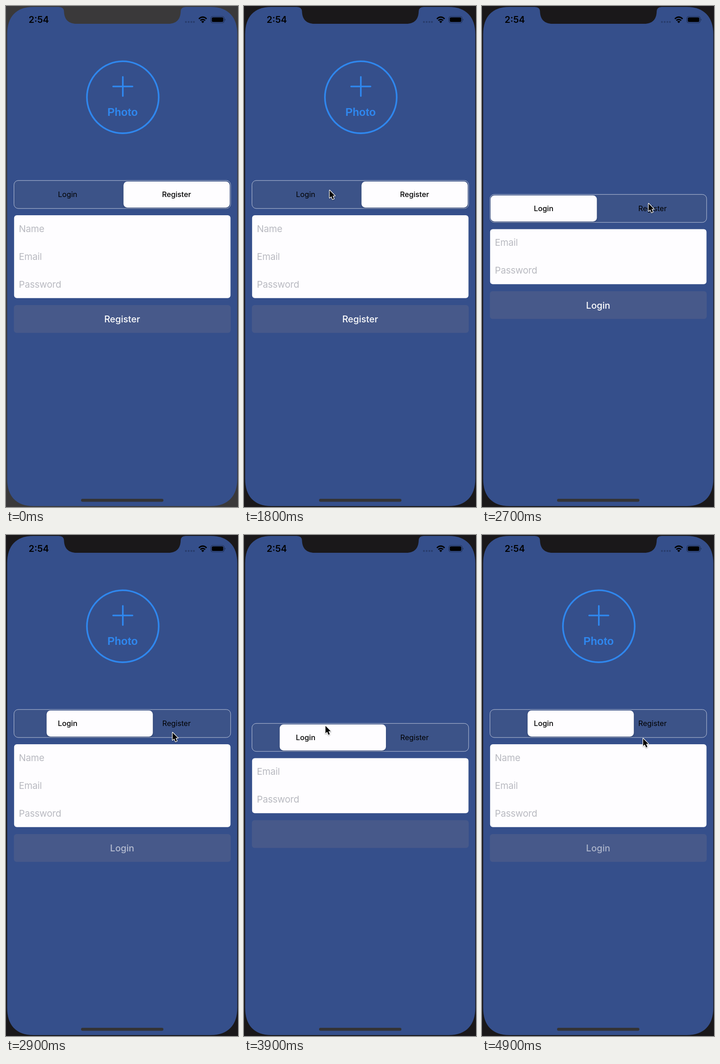
An HTML page that plays this animation: 510x1099 px, repeating every 5 s.

```html
<!DOCTYPE html>
<html lang="en">
<head>
<meta charset="utf-8">
<title>Login and register form</title>
<style>
html, body { margin: 0; width: 100%; height: 100%; overflow: hidden; background: #3a393a; }
svg { display: block; width: 100%; height: 100%; }
text { font-family: Inter, Roboto, sans-serif; }
.mid { text-anchor: middle; }
.tab { font-size: 16.2px; }
.hint { font-size: 20.5px; letter-spacing: -.012em; fill: #b9bac1; }
.photo { fill: none; stroke: #2f87ee; stroke-width: 3.6; stroke-linecap: round; }
.photo text { font: bold 23.5px "Liberation Sans", Arial, sans-serif; fill: #2f87ee; stroke: none; }
#thumb { filter: drop-shadow(0 2px 2px rgba(0, 0, 0, .15)); }
#cursor { filter: drop-shadow(0 1.5px 1px rgba(0, 0, 0, .35)); }
</style>
</head>
<body>
<svg viewBox="0 0 510 1099" preserveAspectRatio="none">
  <rect class="bezel" width="510" height="1099"/>
  <path fill="#354f8b" d="M60 2H450C488 2 508.500 24 508.500 62V1037C508.500 1075 488 1097 450 1097H60C22 1097 2.500 1075 2.500 1037V62C2.500 24 22 2 60 2Z"/>
  <path class="bezel" d="M116 1V2Q127 2 127.500 12C128 30 138 39 155 39H357C374 39 383.500 30 384 12Q384.500 2 395 2V1Z"/>

  <text class="mid" x="72" y="37" font-size="20" font-weight="600">2:54</text>
  <g fill="#283c6b">
    <circle cx="395.500" cy="35" r="2"/><circle cx="401.500" cy="35" r="2"/>
    <circle cx="407.500" cy="35" r="2"/><circle cx="413" cy="35" r="2"/>
  </g>
  <g fill="none" stroke="#000" stroke-width="2.900">
    <path d="M424 28.200Q432.500 20.500 441 28.200M427.200 31.800Q432.500 27 437.800 31.800"/>
    <path fill="#000" stroke="none" d="M429.300 34.200Q432.500 31.500 435.700 34.200L432.500 37.500Z"/>
  </g>
  <rect x="450.500" y="23" width="29" height="14" rx="4" fill="none" stroke="#1f2e51" stroke-width="1.200"/>
  <rect x="452.500" y="25" width="25" height="10" rx="2.500"/>
  <path fill="#1f2e51" d="M481 27.500Q483.500 30 481 32.500Z"/>

  <g id="photo" class="photo">
    <circle cx="256.800" cy="200.200" r="78.900"/>
    <path d="M235.500 176.500H278M256.800 155.500V197.500"/>
    <text class="mid" x="256.300" y="241">Photo</text>
  </g>

  <g id="tabs">
    <rect x="17.500" y="382.800" width="476.300" height="61.400" rx="9.500" fill="#3c5388" stroke="#bcc5da"/>
    <rect id="thumb" y="385" width="233.500" height="57.300" rx="8.500" fill="#fefdff"/>
    <text id="loginTab" class="tab mid" x="135.500" y="419">Login</text>
    <text id="registerTab" class="tab mid" x="374.800" y="419">Register</text>
  </g>

  <rect id="card" x="17.800" width="475.700" rx="6" fill="#fefdff"/>
  <text id="name" class="hint" x="28.300" y="495.500">Name</text>
  <g id="lower">
    <text class="hint" x="28.300" y="556.500">Email</text>
    <text class="hint" x="28.300" y="617.500">Password</text>
    <rect x="17.300" y="656" width="476.700" height="61" rx="6" fill="#47598a"/>
    <text id="title" class="mid" x="255.300" y="694" font-size="20" font-weight="500" fill="#fff"></text>
  </g>

  <rect x="165" y="1081" width="181" height="6.500" rx="3.250" fill="#333335"/>
  <path id="cursor" stroke="#fff" stroke-width="2.600" paint-order="stroke" stroke-linejoin="round"
    d="M1.200 2.500V18.800L4.900 15.400L7.700 22L10.600 20.800L7.800 14.300H12.800Z"/>
</svg>
<script>
const $ = id => document.getElementById(id);
const LOOP = 5000, STEP = 100, SHIFT = 30.5;
const LEFT = 19, RIGHT = 258.3;
// Taps alternate between the Login and Register tabs.
const taps = [1854, 2840, 3750, 4833];
// Pointer stops: time, x, y.
const stops = [
  [100, 353, 699], [600, 187, 402], [1900, 187, 402], [2600, 365, 431],
  [2900, 365, 431], [3600, 173, 410], [3800, 173, 410], [4100, 192, 434],
  [4200, 192, 434], [4700, 353, 444], [LOOP, 353, 444]
];

const mix = (a, b, k) => a + (b - a) * k;
const smooth = k => k * k * (3 - 2 * k);
const spring = ms => { const w = ms * .018; return 1 - (1 + w) * Math.exp(-w); };

function pointer(t) {
  const i = stops.findIndex(s => s[0] > t);
  const a = stops[i - 1], b = stops[i];
  const k = smooth((t - a[0]) / (b[0] - a[0]));
  return [mix(a[1], b[1], k), mix(a[2], b[2], k)];
}

function draw(t) {
  const count = taps.filter(tap => tap <= t).length;
  const login = count % 2 === 1;
  const age = count ? t - taps[count - 1] : LOOP;
  const shift = login ? SHIFT : 0;
  const moved = spring(age);
  const side = login ? 1 - moved : moved;

  document.querySelectorAll(".bezel").forEach(e => e.setAttribute("fill", t < 1800 ? "#3a393a" : "#1a181a"));
  $("photo").style.display = $("name").style.display = login ? "none" : "";
  $("tabs").setAttribute("transform", `translate(0 ${shift})`);
  $("lower").setAttribute("transform", `translate(0 ${-shift})`);
  $("card").setAttribute("y", 459 + shift);
  $("card").setAttribute("height", 181.7 - 2 * shift);

  $("thumb").setAttribute("x", mix(LEFT, RIGHT, side));
  $("loginTab").setAttribute("font-weight", side < .5 ? 500 : 400);
  $("registerTab").setAttribute("font-weight", side < .5 ? 400 : 500);

  // The old title fades out, then the new one fades in.
  const fade = age / 150 - 1;
  $("title").textContent = login === fade >= 0 ? "Login" : "Register";
  $("title").setAttribute("opacity", Math.min(1, Math.abs(fade)));

  $("cursor").style.display = t < stops[0][0] ? "none" : "";
  if (t >= stops[0][0]) $("cursor").setAttribute("transform", `translate(${pointer(t)})`);
}

function tick() {
  draw(Math.floor(performance.now() % LOOP / STEP) * STEP);
  requestAnimationFrame(tick);
}
tick();
</script>
</body>
</html>
```
